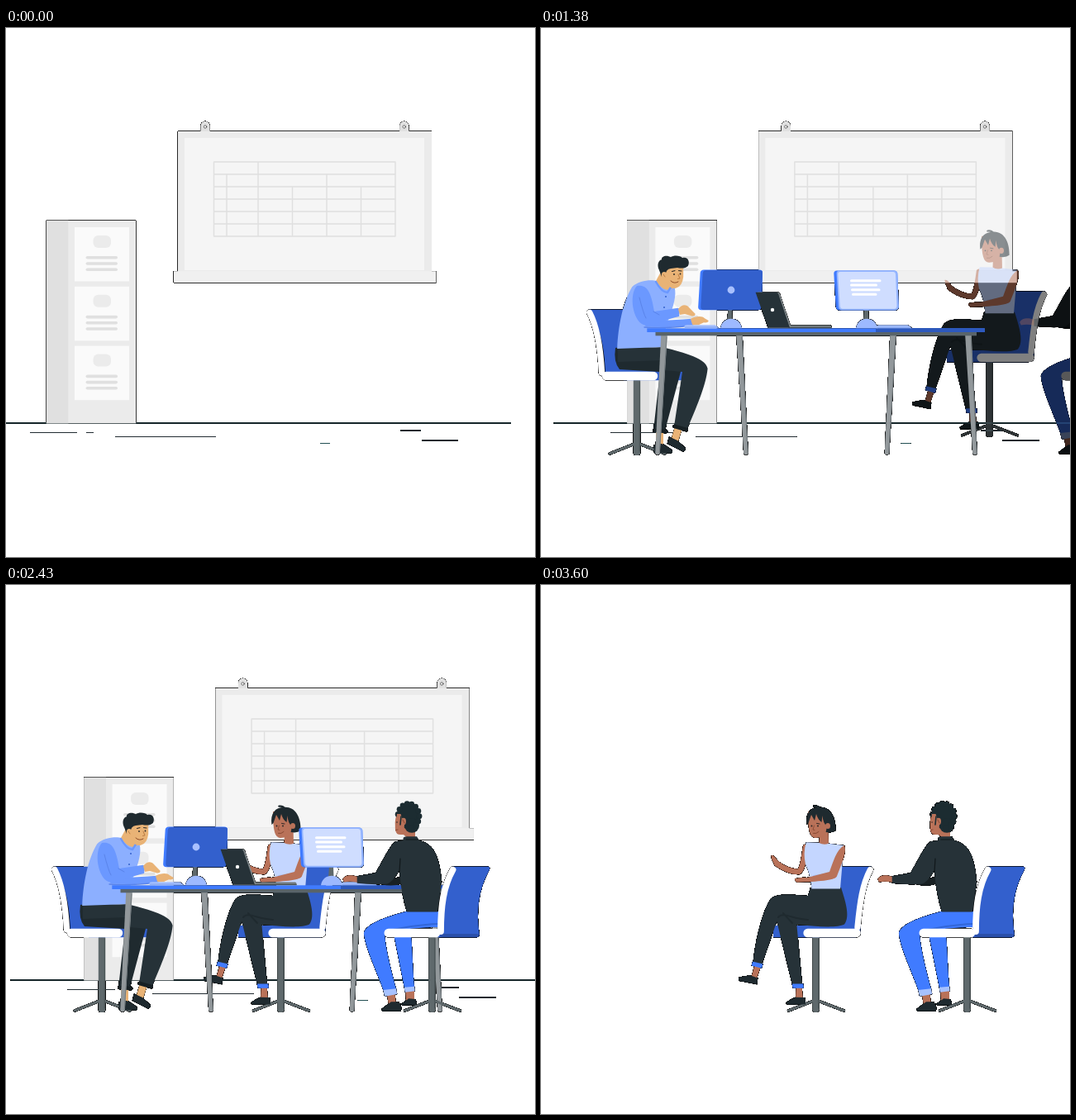
Recreate the animation shown at these times as an HTML page. Size 640 by 640 pixels, loop 3.63 s.

```html
<!DOCTYPE html>
<html lang="en">
<head>
<meta charset="utf-8">
<title>Office team</title>
<style>
  html, body { margin: 0; width: 100%; height: 100%; overflow: hidden; background: #fff; }
  svg { display: block; width: 100vw; height: 100vh; }
</style>
</head>
<body>
<svg viewBox="0 0 640 640" fill="none" stroke-linecap="round" stroke-linejoin="round">
  <!-- hard-edged alpha over black gives the thin dark rims -->
  <filter id="rim" filterUnits="userSpaceOnUse" x="0" y="0" width="640" height="640" color-interpolation-filters="sRGB">
    <feComponentTransfer in="SourceGraphic" result="hard"><feFuncA type="linear" slope="12" intercept="-.4"/></feComponentTransfer>
    <feFlood flood-color="#000" result="ink"/>
    <feMerge result="flat"><feMergeNode in="ink"/><feMergeNode in="SourceGraphic"/></feMerge>
    <feComposite in="flat" in2="hard" operator="in"/>
  </filter>
  <g filter="url(#rim)">
    <g id="room"></g>
    <g id="woman"></g>
    <g id="typist"></g>
    <g id="desk"></g>
    <g id="colleague"></g>
  </g>
</svg>
<script>
const LOOP = 3630, STEP = 30, CUT = 3600;
const DARK = '#263238', DEEP = '#1f2a2f', BLUE = '#407bff', NAVY = '#3360cd',
      PALE = '#8cafff', SLEEVE = '#6b98ff', ICE = '#c4d6ff', STEEL = '#5f696c';
const el = id => document.getElementById(id);
const fill = (d, c) => `<path d="${d}" fill="${c}"/>`;
const line = (d, c, w = 1) => `<path d="${d}" stroke="${c}" stroke-width="${w}"/>`;
const rect = (x, y, w, h, c, r = 0) => `<rect x="${x}" y="${y}" width="${w}" height="${h}" rx="${r}" fill="${c}"/>`;
const dot = (x, y, rx, c, ry = rx) => `<ellipse cx="${x}" cy="${y}" rx="${rx}" ry="${ry}" fill="${c}"/>`;

function chairBase(x) {
  return line(`M${x} 502L${x - 33} 515M${x} 502L${x + 34} 515`, STEEL, 3.2) +
    rect(x - 4.2, 424, 8.4, 93, STEEL, 3) + line(`M${x + 3.3} 428V512`, '#465053', 1);
}

function drawRoom() {
  let s = rect(-40, 477, 651, 1.9, '#17282c');
  s += rect(29, 489, 57, .9, DARK) + rect(97, 489, 9, .9, DARK) + rect(132, 494, 122, .9, DARK) +
    rect(380, 502, 12, .9, '#285a5e') + rect(477, 486.2, 25, 1.7, DARK) + rect(503, 498.2, 44, 1.7, DARK);
  s += rect(48.8, 232.8, 108.4, 245.5, '#ebebeb') + rect(48.8, 232.8, 26.6, 245.5, '#e0e0e0');
  for (let i = 0; i < 3; i++) {
    const y = 241 + i * 71.8;
    s += rect(83, y, 66, 65.5, '#fafafa') + rect(105.5, y + 10, 21.5, 15, '#ebebeb', 6);
    for (let k = 0; k < 3; k++) s += rect(96.5, y + 35 + k * 7.2, 38.5, 3.6, '#e0e0e0', 1.8);
  }
  for (const x of [241, 481.7])
    s += fill(`M${x - 5.6} 126V118.4A5.6 5.6 0 0 1 ${x + 5.6} 118.4V126Z`, '#e0e0e0') +
      `<circle cx="${x}" cy="119.5" r="1.7" fill="#fff" stroke="#333" stroke-width=".7"/>`;
  s += rect(207.8, 124.8, 307.2, 172, '#ebebeb') + rect(216, 133, 290, 160, '#f5f5f5') +
    rect(202.8, 294.2, 317.6, 14, '#f0f0f0');
  let grid = 'M251.5 162H471V252H251.5ZM305 162V252M267 177V252M388 177V252M346.5 192V252M429.5 192V252';
  for (let y = 177; y < 250; y += 15) grid += `M251.5 ${y}H471`;
  return s + line(grid, '#e0e0e0', 1.5);
}

function drawDesk() {
  let s = '';
  const leg = (a, b) => fill(`M${a - 3.8} 372H${a + 3.8}L${b + 2.8} 515Q${b} 518 ${b - 2.8} 515Z`, '#92989b') +
    line(`M${a + 3} 374L${b + 2.2} 515`, '#737b7f', 1);
  s += leg(149, 141) + leg(240, 248) + leg(426, 418.5) + leg(517, 525);
  s += rect(138.5, 368, 388.5, 4.3, '#59646a') + rect(128.3, 363.3, 408.5, 4.7, BLUE) +
    rect(405, 363.3, 131.8, 4.7, '#2d59bd');
  const foot = x => fill(`M${x - 13} 363.3C${x - 11} 348 ${x + 11} 348 ${x + 13} 363.3Z`, '#9db9ff');
  const keys = (x, w) => fill(`M${x} 363.3V361Q${x} 359.3 ${x + 3} 359.3H${x + w - 5}L${x + w} 363.3Z`, '#a6c1ff') +
    line(`M${x + 1} 362H${x + w - 2}`, '#7e9fec', 1);
  s += keys(173.5, 42) + keys(406, 43);
  s += fill('M227 336H231L231.5 354H225Z', STEEL) + foot(230);
  s += fill('M197 292.6H264Q268.3 292.6 268 296L266.8 337Q266.4 341.2 262 341.2H194Q189.8 341 190.2 337L192.7 296Q193.2 292.7 197 292.6Z', BLUE);
  s += fill('M200 293H264Q268.2 293 268 296L266.8 337Q266.4 341 262 341H197Q193 341 193.3 337L195.6 297Q196 293 200 293Z', NAVY);
  s += dot(230, 317, 4.4, '#a8c0ff');
  s += fill('M391 340H396L396.5 354H390Z', STEEL) + foot(394);
  s += fill('M358 293.4H427Q431 293.6 431.3 297L432.8 337Q432.8 341.4 428 341.6H361Q357 341.4 356.7 337L354.3 297Q354.3 293.5 358 293.4Z', BLUE);
  s += fill('M361 293.4H427Q431 293.6 431.3 297L432.8 337Q432.8 341.4 428 341.6H364Q360.5 341.4 360 337L357.6 297Q357.6 293.5 361 293.4Z', '#94b5ff');
  s += fill('M362 295H426Q428.6 295 429 298L430.5 336Q430.5 339.5 427 339.7H365Q362 339.5 361.7 336L359.3 298Q359.3 295 362 295Z', '#cfddff');
  s += line('M375.5 305.8H410M375.5 311H405.5M376.5 316.8H409M377.5 322.3H405', '#fff', 3);
  s += fill('M274 363.3L276 359.6H350Q351.8 360 351.8 363.3Z', '#70797c') + line('M300 362.5H351', '#465053', 1.2);
  s += fill('M262 319.6H286Q288.3 319.7 289 321.5L302.6 362H277Z', '#828a8d');
  s += fill('M259.6 319.8H284.4Q286.4 319.9 287.2 321.5L301 362.5H274.5Z', DARK) + dot(280, 341, 2.2, '#fff');
  return s;
}

function drawWoman() {
  const skin = '#b97259';
  let s = chairBase(332.5);
  s += fill('M352 340.8H400Q391 355 388 380L386 424H355Z', NAVY) +
    fill('M281 412H384V423Q384 426.3 380 426.3H281Z', NAVY) +
    line('M398.4 344.6C389 362 386 384 383 414', '#fff', 7.4) +
    line('M322.6 421H381.6', '#fff', 10.4);
  s += line('M320 317C318 330 317 343 312 347C302 347 292 342 285 337', skin, 6.6) +
    fill('M287 341C281 338 278.5 332 278.5 327Q281 326.5 283 329L287 334L291 337Z', skin);
  s += fill('M309 478H315L317 503H308Z', skin) + fill('M259 458L266 461L261 476H254Z', skin);
  s += fill('M296.6 505Q304 500 308 498.7L319 499Q320.6 503 320 507.4H297Z', DEEP) +
    fill('M239.3 474.7Q247 473 253 472.2L262.3 475.5L261.3 483.3Q250 481 240 479Q238.5 477 239.3 474.7Z', DEEP);
  s += fill('M326 366H363C368 382 374.6 401 367 410.6C358 415.6 330 412.8 309.4 411L316.2 485H304.3L285.3 407L267.3 459L256.7 456C259.3 431 266.3 400 276.3 382C281 373.4 294 373.4 323 376Z', DARK) +
    line('M287 402C293 395 303 404 323 405M293 397L304 409', DEEP, 2);
  s += fill('M256 455.5L268.5 458.5L267 463.8L254.7 460.5Z', BLUE) + fill('M303.7 482.5H317.3L317.8 487.8H304.7Z', BLUE);
  s += fill('M337 301L347.6 297L348 314Q341 317 336.5 312Z', skin);
  s += fill('M320.7 311.3L336 311.7Q342 315 348 312.7L366.5 315L362 367.5H327.5Q326 350 320 338Q317 325 320.7 311.3Z', ICE) +
    line('M361 326L355 348L330 352', '#a9c2fa', 2);
  s += fill('M366.8 314.8C369.6 320 367.6 329 357.8 352.8C355 357.6 335 358.8 310 359.8Q306.4 358 307.2 355.2Q315 353 322 354L349 347C354 334 357 321 366.8 314.8Z', skin);
  s += fill('M323 274Q322.6 290 325 299Q327 306 332 306Q341 306 347 298L347 276Z', skin);
  s += fill('M321.4 290C319.5 276 326 269 336 268.8C349 267.5 356.8 279 356.6 297Q352 300.6 344.6 299L346 292Q341 288 340.5 279L339.5 287Q335 284 333 277L331 285L327 278L323.5 288Z', DEEP) +
    line('M330.3 267.7Q335 267 337 270', DEEP, 2.2);
  s += dot(347, 291.5, 3, skin, 3.6) + dot(327.5, 291.5, .9, '#222') + dot(335, 291.5, .9, '#222') +
    line('M330.5 291L329 296L331 296.5', '#84452f', .8) + line('M329.5 300.5Q333 301.5 336 298.5', '#84452f', .9) +
    line('M333.5 288.4L337 289', '#222', .9);
  return s;
}

function drawTypist() {
  const skin = '#e9b376';
  let s = chairBase(116);
  s += fill('M58 340.8H112V426H78C78 390 72 361 58 340.8Z', NAVY) +
    fill('M100 412H179Q179 426.3 174 426.3H100Z', NAVY) +
    line('M58.8 344.4C68 362 72 388 73.5 417', '#fff', 7.4) + line('M79 421H136', '#fff', 10.4);
  s += fill('M139 483H148V505H139Z', skin) + fill('M162 482L171 484L166 500L158 496Z', skin);
  s += fill('M136.3 505Q142 501 149 504L158 510Q160.6 514 157 514.4H137Z', DEEP) +
    fill('M155 494.2Q160 497 165 499L174.8 508Q174.8 512.8 171 512.2L152.7 503Z', DEEP);
  s += fill('M90 387C106 384 130 386 148 388C158 393 171 403 170 412L150 487H136L144 416L95 413Q87.4 404 90 387Z', DEEP) +
    fill('M93 388L147 386C165 391 199.6 398 201.6 412C199.6 433 187 461 176.8 485.8L161 482L171 416L150 414C143 408 143 404 145 402L93 404Z', DARK) +
    line('M137.3 487L151 488M161.7 482L175.8 486', '#172024', 4.6);
  s += fill('M110.2 313.2C119 305.3 133 304.3 140 306.2L160 309C164.8 319 161.8 331 157 345C151 359 149 371 147 386L92.2 388C93.2 361 99.2 331 110.2 313.2Z', PALE);
  s += line('M143 350L129 357Q150 359 182 356', SLEEVE, 8.6) + line('M125 362Q150 364 181 360', '#5a84ea', 1.4);
  s += fill('M181 352C188 348.3 195 348.3 198 351.2L202.7 354Q202.7 356.8 197 356.3Q190 360.7 183 358.8Z', skin);
  s += fill('M116 312C128 310 133 318 137 343L164 339Q168 338 168 342L167 349C151 352 138 361 124 359C111 354 106 323 116 312Z', SLEEVE) +
    line('M136 343L143 347M119 326Q124 346 127 351', '#5a84ea', 1);
  s += fill('M166 340C170 334 176 334 179 338L186.8 346Q186 349.8 181 348L174 346L168 347Z', skin);
  s += fill('M139 306L146 293H160L160 314Q151 323 139 306Z', skin) +
    line('M139 307Q146 320 153 320L160 309', SLEEVE, 2.4) +
    dot(151, 325, 1, NAVY) + dot(149, 338, 1, NAVY);
  s += fill('M147 288Q148 303 152 309Q156 316 163 314.8Q171 313 172.2 301V288L165 282H149Z', skin);
  s += fill('M143 293C139.4 286 143 280.3 146 280.3C145.3 275.3 153 274.4 157 277.2C161 274.4 169 275.3 171 278.2C177.8 276.3 180.6 283 177.8 288Q174 291.7 165 290L157 291Q151 291 150 301L146 301Z', DEEP) +
    dot(149, 299, 3.2, skin, 4) + line('M148 298L150 301', '#b5763e', .9);
  s += dot(161, 298, .9, '#222') + dot(168.5, 297.5, .9, '#222') + line('M158.5 294.5L162 293.6M166.5 293.6L170 294', '#222', 1) +
    line('M166 298L168 303L165.5 303.5', '#b5763e', .9) + line('M157 306Q161 310 166 307', '#8d4c29', 1);
  return s;
}

function drawColleague() {
  const skin = '#b97259', hair = '#1c2c31';
  let s = fill('M460 490H470L472 508H463Z', skin) + fill('M483 486H494V503H484Z', skin);
  s += fill('M454.3 513Q462 507 466 504.2L475 504.2Q479.7 510 477.7 515.4H455Z', DEEP) +
    fill('M477.3 507Q484 503 487 500.2L495 501Q497.7 505 495.8 508.3H479Z', DEEP);
  s += chairBase(515.5);
  s += fill('M540 340.8H584Q586.6 342 583.7 347C571.7 369 568.7 395 572.7 422Q572.7 426.3 569 426.3H522Z', NAVY) +
    line('M527 424H570', '#2b50aa', 4);
  s += fill('M468 417L489 415C492 435 491.7 464 494.2 488L482.3 489Z', BLUE) +
    fill('M484 395H523V414C500 414 477 417 459 420C456.3 424 463 456 472.5 490L457.3 492C446.3 462 434.3 438 432.9 421C435.3 409.3 464 400.3 484 395Z', BLUE) +
    line('M523 410Q495 411 468 417', '#3266d7', 2);
  s += fill('M456.3 490L472 488.2L473.2 495L458.2 497.7Z', '#a6c1ff') + fill('M481.8 486.7L494.2 485.7L494.7 491.3L482.7 492.7Z', '#a6c1ff');
  s += line('M540.5 344.7C529 365 526 389 526 419', '#fff', 7.8) + line('M462.7 421H520', '#fff', 10.4);
  s += line('M478 357Q468 361 455 358', '#182023', 8.6);
  s += fill('M407.3 356C410.3 350.3 418 350.3 425 352.7V359.8Q416 357.8 409 359.5Z', skin);
  s += fill('M481 297L495 298V306Q488 309 481 302Z', skin);
  s += fill('M481 309Q479 304.2 485 304.2H497L500 309C518.7 313 524.7 330 527.2 359L522 395.5H485C481 383 477 364 476 345C471 354 465 361.8 459 361.8C448 362.8 435 361.8 424.7 360.8V352.2L447 348.2C455 336 463.2 316 471.2 310.2Z', DARK) +
    line('M476 347L477 331M484 308H498', '#11181b', 1.2);
  s += fill('M473.3 275Q470.3 284 470.8 290Q470.3 301 475 301.8L485 302.3L492 286L485 272Z', skin);
  s += dot(488, 280, 13, hair, 15.6) + dot(491, 291, 9, hair, 8.8);
  for (let i = 0; i < 11; i++) {
    const a = -3.0 + i * .43;
    s += dot(487 + 13 * Math.cos(a), 279.5 + 15 * Math.sin(a), 3.4, hair);
  }
  s += fill('M473 277L477.5 277L482 290L481 302Q472 302 471 296Z', skin) + dot(481, 286, 3, skin, 4.2) +
    line('M480 284L482 288', '#84452f', .9) + line('M477 290L478 280', hair, 1.6) +
    dot(473, 287, .8, '#222') + line('M471.5 296.5L474 296', '#84452f', .9);
  return s;
}

const draw = { room: drawRoom, woman: drawWoman, typist: drawTypist, desk: drawDesk, colleague: drawColleague };
for (const id in draw) el(id).innerHTML = draw[id]();

// start, end, x and y travel, opacity gain
const entries = {
  desk: [150, 750, 0, 0, 1],
  typist: [700, 1340, -271, 0, 1],
  woman: [1080, 1800, 360, -38, 1.2],
  colleague: [1170, 1780, 262, 0, 1]
};
const leavesFirst = ['room', 'desk', 'typist'];

function render(t) {
  const sway = 31.5 * (1 - Math.cos(2 * Math.PI * (t + 25) / LOOP));
  el('room').setAttribute('transform', `translate(${sway.toFixed(2)} 0)`);
  for (const id in entries) {
    const [start, end, dx, dy, gain] = entries[id];
    const p = Math.min(1, Math.max(0, (t - start) / (end - start))), rest = 1 - p;
    el(id).setAttribute('transform', `translate(${(dx * rest).toFixed(2)} ${(dy * rest).toFixed(2)})`);
    el(id).setAttribute('opacity', Math.min(1, p * gain));
  }
  for (const id of leavesFirst) el(id).setAttribute('visibility', t >= CUT ? 'hidden' : 'visible');
}

const began = performance.now();
function tick() {
  const t = (performance.now() - began) % LOOP;
  render(Math.floor(t / STEP) * STEP);
  requestAnimationFrame(tick);
}
tick();
</script>
</body>
</html>
```
